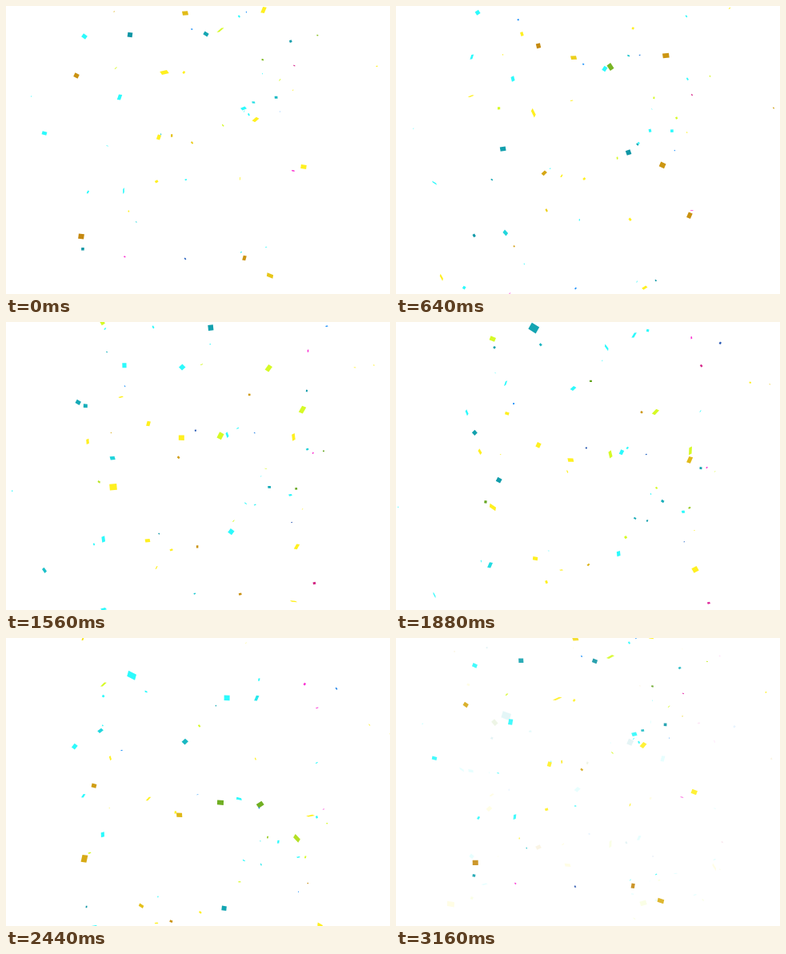
Animation of 480x360 px, one loop 3200 ms. Source, as an HTML page:

```html
<!DOCTYPE html>
<html lang="en">
<head>
<meta charset="utf-8">
<title>Confetti</title>
<style>
  html, body { margin: 0; width: 100%; height: 100%; overflow: hidden; background: #fff; }
  svg { display: block; width: 100vw; height: 100vh; overflow: hidden; }
</style>
</head>
<body>
<svg id="stage" viewBox="0 0 480 360"></svg>
<script>
const LOOP = 3200, STEP = 40, FADE_START = 2840, SEAM = 50;
const NS = 'http://www.w3.org/2000/svg';
const stage = document.getElementById('stage');

// Lit and shaded side of each paper colour.
const PAPER = {
  yellow: [[255, 240, 32], [196, 136, 16]],
  cyan: [[44, 250, 252], [16, 150, 165]],
  lime: [[214, 250, 38], [100, 165, 35]],
  pink: [[250, 50, 210], [190, 30, 90]],
  blue: [[40, 150, 250], [40, 80, 170]]
};

// Large pieces: x, y at time zero, drift and fall in px/s, size.
const LARGE = {
  yellow: [
    [178, -4, 0, 84, 6], [224, 9, -3, 87, 7], [198, 83, -41, 79, 9],
    [312, 142, 33, 89, 7], [322, 5, 24, 89, 8], [191, 164, -9, 70, 6],
    [94, 288, -58, 80, 7], [330, 337, -10, 95, 8], [298, 315, 20, 58, 6],
    [372, 201, -8, 95, 7], [167, -6, -15, 64, 5], [88, 87, 9, 40, 6]
  ],
  cyan: [
    [142, 114, -13, 101, 7], [155, 36, -14, 86, 6], [297, 128, -10, 86, 6],
    [250, 35, 17, 68, 6], [48, 159, 0, 97, 6], [214, -73, 4, 83, 6],
    [220, -113, 23, 77, 7], [245, -181, 28, 105, 7], [223, -124, -27, 70, 11],
    [201, -55, -34, 70, 6], [98, 38, -5, 40, 6], [104, -59, -3, 105, 5],
    [147, 231, -16, 82, 6]
  ],
  lime: [
    [268, 30, 0, 72, 8], [117, -103, 2, 66, 7],
    [383, -140, -8, 160, 9], [347, -209, -12, 171, 8]
  ]
};

let seed = 20417;
function random() {
  seed = (seed * 16807) % 2147483647;
  return seed / 2147483647;
}
const between = (low, high) => low + (high - low) * random();

const pieces = [];
function addPiece(color, [x, y, vx, vy, size]) {
  pieces.push({
    paper: PAPER[color], x, y, vx, vy, size,
    turn: between(0, 6.28), turnSpeed: between(-2.5, 2.5),
    flip: between(0, 6.28), flipSpeed: between(2, 5),
    ratio: between(0.7, 1.05)
  });
}

for (const color in LARGE) LARGE[color].forEach(row => addPiece(color, row));

const SMALL_COLORS = ['cyan', 'cyan', 'cyan', 'cyan', 'yellow', 'yellow', 'yellow', 'pink', 'blue', 'lime'];
for (let i = 0; i < 60; i++) {
  const spread = random() + random() + random() - 1.5;
  const x = 235 + spread * 190;
  const row = [x, between(-230, 320), (x - 235) * 0.08 + between(-8, 8), between(55, 85), between(1.4, 3.8)];
  addPiece(SMALL_COLORS[i % SMALL_COLORS.length], row);
}

function makeLayer() {
  const group = stage.appendChild(document.createElementNS(NS, 'g'));
  const paths = pieces.map(() => group.appendChild(document.createElementNS(NS, 'path')));
  return { group, paths };
}

function outline(piece, time) {
  const cx = piece.x + piece.vx * time, cy = piece.y + piece.vy * time;
  const angle = piece.turn + piece.turnSpeed * time;
  const tilt = Math.cos(piece.flip + piece.flipSpeed * time);
  const half = piece.size / 2;
  const height = half * piece.ratio * (0.25 + 0.75 * Math.abs(tilt));
  const skew = half * 0.35 * (1 - Math.abs(tilt));
  const c = Math.cos(angle), s = Math.sin(angle);
  const corners = [[-1, -1], [1, -1], [1, 1], [-1, 1]].map(([u, v]) => {
    const px = u * half + v * skew, py = v * height;
    return (cx + px * c - py * s).toFixed(2) + ' ' + (cy + px * s + py * c).toFixed(2);
  });
  return 'M' + corners.join('L') + 'Z';
}

function shade(piece, time) {
  const tilt = Math.cos(piece.flip + piece.flipSpeed * time);
  const dark = Math.max(0, -tilt - 0.45) / 0.55;
  const [lit, shaded] = piece.paper;
  return `rgb(${lit.map((v, i) => Math.round(v + (shaded[i] - v) * dark))})`;
}

function drawLayer(layer, ms, opacity) {
  layer.group.setAttribute('opacity', opacity);
  if (!opacity) return;
  const time = ms / 1000;
  pieces.forEach((piece, i) => {
    layer.paths[i].setAttribute('d', outline(piece, time));
    layer.paths[i].setAttribute('fill', shade(piece, time));
  });
}

const falling = makeLayer(), incoming = makeLayer();

function render(now) {
  const t = Math.floor((now % LOOP) / STEP) * STEP;
  const blend = Math.max(0, (t - FADE_START) / (LOOP - FADE_START));
  drawLayer(falling, t, 1 - blend);
  drawLayer(incoming, t - LOOP - SEAM, blend);
}

const start = performance.now();
function tick() {
  render(performance.now() - start);
  requestAnimationFrame(tick);
}
tick();
</script>
</body>
</html>
```
